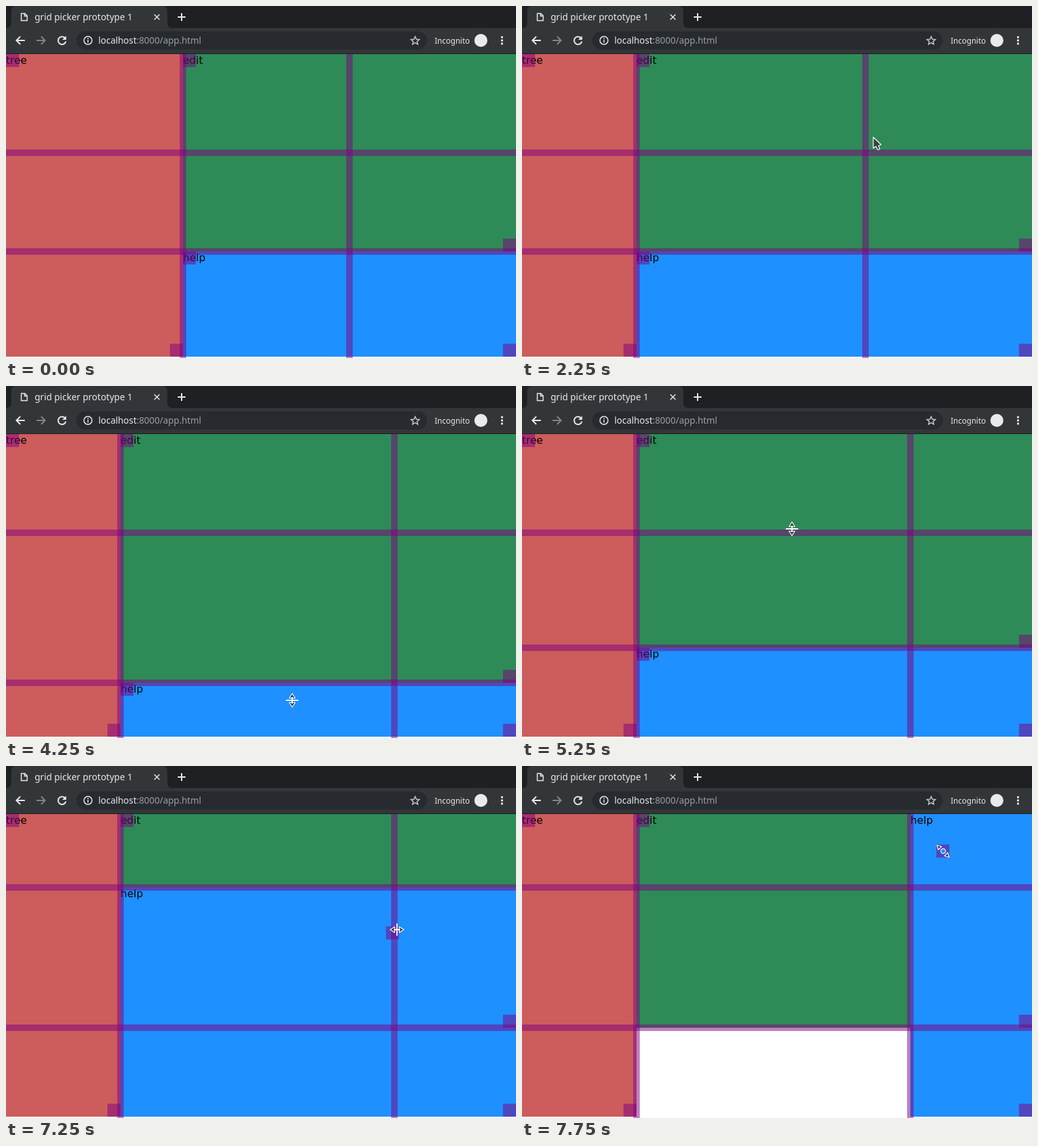
An HTML page that plays this animation: 784 by 542 pixels, repeating every 8 s.

```html
<!DOCTYPE html>
<html lang="en">
<head>
<meta charset="utf-8">
<title>grid picker prototype 1</title>
<style>
  html, body { margin: 0; width: 100%; height: 100%; overflow: hidden; background: #fff; }
  svg { display: block; width: 784px; height: 542px; }
  .ui { font: 14px "Noto Sans", sans-serif; fill: #e8eaed; }
  .ui .dim { fill: #9aa0a6; }
  .line { fill: none; stroke: #e8eaed; stroke-width: 2; }
  .thin { stroke-width: 1.5; }
  .label { font: 16px "DejaVu Sans", sans-serif; fill: #000; }
  .veil { fill: purple; fill-opacity: .5; }
  .cursor { fill: #3b403e; stroke: #fff; stroke-width: 1.2; stroke-linejoin: round; }
</style>
</head>
<body>
<svg viewBox="0 0 784 542">
  <g id="areas" shape-rendering="crispEdges"></g>
  <g id="labels" class="label"></g>
  <g id="veils" class="veil" shape-rendering="crispEdges"></g>

  <g class="ui">
    <path fill="#1e2023" d="M0 0H784V34H0Z"/>
    <path fill="#323639" d="M0 34Q8 34 8 26V8Q8 0 16 0H240Q248 0 248 8V26Q248 34 256 34H784V73H0Z"/>
    <path fill="#1b1c1e" d="M0 73H784V74H0Z"/>
    <rect x="108" y="39" width="539" height="28" rx="14" fill="#272a2e"/>
    <text x="44" y="22">grid picker prototype 1</text>
    <text x="142" y="58" font-size="13.9">localhost<tspan class="dim">:8000/app.html</tspan></text>
    <text x="659" y="58" font-size="12">Incognito</text>
    <g class="line">
      <path class="thin" d="M23.5 11.5H29L32.5 15V22.5H23.5ZM28.5 11.5V15.5H32.5"/>
      <path class="thin" d="M228 13L236 21M236 13L228 21"/>
      <path d="M264 17H276M270 11V23"/>
      <path d="M29 53H16.5M22 47L16 53L22 59"/>
      <path stroke="#82868a" d="M47 53H59.5M54 47L60 53L54 59"/>
      <path d="M90.5 49A6 6 0 1 0 92 54.5"/>
      <circle class="thin" cx="126" cy="53" r="6.2"/>
      <path class="thin" d="M126 52V56.5M126 49.3V50.9"/>
      <path class="thin" stroke="#c4c7ca" d="M629 47L630.9 51.2L635.4 51.6L632 54.6L633 59L629 56.7L625 59L626 54.6L622.6 51.6L627.1 51.2Z"/>
    </g>
    <path d="M92.5 46V52H86.5Z"/>
    <circle cx="730" cy="53" r="10"/>
    <circle cx="762.5" cy="48" r="1.7"/>
    <circle cx="762.5" cy="53" r="1.7"/>
    <circle cx="762.5" cy="58" r="1.7"/>
  </g>

  <g id="cursor" class="cursor"></g>
</svg>
<script>
const NS = "http://www.w3.org/2000/svg";
const STEP = 250, STEPS = 32;
const LEFT = 0, TOP = 74, RIGHT = 784, BOTTOM = 540, FLOOR = 542;
const GRIP = 20, GUTTER = 10;
const ENTRY = { step: 1, point: [755, 20] };

const lines = { col1: 272, col2: 528, row1: 226, row2: 378 };

// Each drag swings its line to and fro before it comes to rest.
const gestures = [
  { line: "col1", start: 4, end: 8, rest: 176, swing: -122, turns: 1, grab: [272, 187] },
  { line: "col2", start: 9, end: 13, rest: 600, swing: 284, turns: 2, grab: [540, 205] },
  { line: "col2", start: 13, end: 14, rest: 597, swing: 0, turns: 1, grab: [600, 205] },
  { line: "row2", start: 16, end: 20, rest: 403, swing: 110, turns: 2, grab: [440, 378] },
  { line: "row1", start: 21, end: 24, rest: 187, swing: -130, turns: 2, grab: [415, 220] },
  { start: 25, end: 31, grab: [186, 413],
    path: [[25, 186, 413], [28, 650, 455], [29, 594, 257], [30, 643, 225], [31, 647, 131]] }
];
const move = gestures[gestures.length - 1];

const split = '<path d="M-3.5-4.5V4.5L-10.5 0ZM3.5-4.5V4.5L10.5 0Z"/><path d="M0-9.5V9.5M-5 0H5" stroke-width="1.8"/>';
const cursors = {
  arrow: '<path d="M0-3V14L4 11L7 16.5L10 15.5L8 10L12 8.5Z"/>',
  col: split,
  row: `<g transform="rotate(90)">${split}</g>`,
  grip: '<path d="M-9-9L-2-7L-7-2ZM9.5 9.5L2.5 7.5L7.5 2.5Z"/><circle cx=".5" r="3.6" fill="#1e90ff"/>'
};

const byId = id => document.getElementById(id);
const add = (parent, tag) => byId(parent).appendChild(document.createElementNS(NS, tag));
const mix = (a, b, k) => a + (b - a) * k;

function set(el, attrs) {
  for (const key in attrs) el.setAttribute(key, attrs[key]);
}

function box(el, x, y, width, height) {
  set(el, { x, y, width: Math.max(0, width), height: Math.max(0, height) });
}

function lineAt(name, step) {
  return Math.round(gestures.reduce((from, g) => {
    if (g.line !== name || step <= g.start) return from;
    const u = Math.min(1, (step - g.start) / (g.end - g.start));
    return mix(from, g.rest, u * u) + g.swing * Math.sin(Math.PI * g.turns * u ** (3 / g.turns));
  }, lines[name]));
}

function travel(from, to, k) {
  return from.map((v, i) => Math.round(mix(v, to[i], k)));
}

function along(path, step) {
  const t = Math.min(step, path[path.length - 1][0]);
  const i = Math.max(1, path.findIndex(key => key[0] >= t));
  const [a, ...from] = path[i - 1], [b, ...to] = path[i];
  return travel(from, to, Math.max(0, (t - a) / (b - a)));
}

// The hand is a little ahead of whatever it drags.
function ride(g, step) {
  if (g.path) return along(g.path, step + 1 / 7);
  const value = lineAt(g.line, Math.min(g.end, step + 1 / 3));
  return g.line.startsWith("col") ? [value, g.grab[1]] : [g.grab[0], value];
}

function pointerAt(step) {
  const held = gestures.find(g => step > g.start && step <= g.end);
  if (held) return { held, point: ride(held, step) };
  const next = gestures.findIndex(g => step <= g.start);
  const last = gestures[next - 1], goal = gestures[next];
  const from = last ? { step: last.end, point: ride(last, last.end) } : ENTRY;
  const k = (step - from.step) / (goal.start - from.step);
  return { point: travel(from.point, goal.grab, k) };
}

function shapeOf(held, [x, y], cols, rows) {
  if (held && held.line) return held.line.slice(0, 3);
  const near = (value, list) => list.some(v => Math.abs(v - value) <= 6);
  if (near(x, cols)) return "col";
  if (near(y, rows)) return "row";
  return held ? "grip" : "arrow";
}

const panes = [["tree", "indianred"], ["edit", "seagreen"], ["help", "dodgerblue"]].map(([name, fill]) => {
  const pane = { area: add("areas", "rect"), label: add("labels", "text") };
  set(pane.area, { fill });
  pane.label.textContent = name;
  return pane;
});
const gutters = Array.from({ length: 4 }, () => add("veils", "rect"));
panes.forEach(pane => {
  pane.start = add("veils", "rect");
  pane.end = add("veils", "rect");
});

function place(pane, x, y, right, bottom, grip = [x, y]) {
  box(pane.area, x, y, right - x, bottom - y);
  set(pane.label, { x, y: y + 15 });
  box(pane.start, ...grip, GRIP, GRIP);
  box(pane.end, right - GRIP, bottom - GRIP, GRIP, GRIP);
}

function render(step) {
  const [c1, c2, r1, r2] = Object.keys(lines).map(name => lineAt(name, step));
  const [tree, edit, help] = panes;

  place(tree, LEFT, TOP, c1, BOTTOM);
  place(edit, c1, TOP, RIGHT, r2);
  if (step <= move.start) {
    place(help, c1, r2, RIGHT, BOTTOM);
  } else {
    // The pane starts in the cell under its grip.
    const [gx, gy] = along(move.path, step);
    const x = [c2, c1].find(c => gx > c) || LEFT;
    const y = [r2, r1].find(r => gy > r) || TOP;
    place(help, x, y, RIGHT, BOTTOM, [gx - GRIP / 2, gy - GRIP / 2]);
  }

  [c1, c2].forEach((c, i) => box(gutters[i], c - GUTTER / 2, TOP, GUTTER, FLOOR - TOP));
  [r1, r2].forEach((r, i) => box(gutters[i + 2], LEFT, r - GUTTER / 2, RIGHT, GUTTER));

  const cursor = byId("cursor");
  const { held, point } = pointerAt(step);
  cursor.innerHTML = step < ENTRY.step ? "" : cursors[shapeOf(held, point, [c1, c2], [r1, r2])];
  set(cursor, { transform: `translate(${point})` });
}

const began = performance.now();
let shown = -1;
function tick() {
  const step = Math.floor((performance.now() - began) / STEP) % STEPS;
  if (step !== shown) render(shown = step);
  requestAnimationFrame(tick);
}
tick();
</script>
</body>
</html>
```
